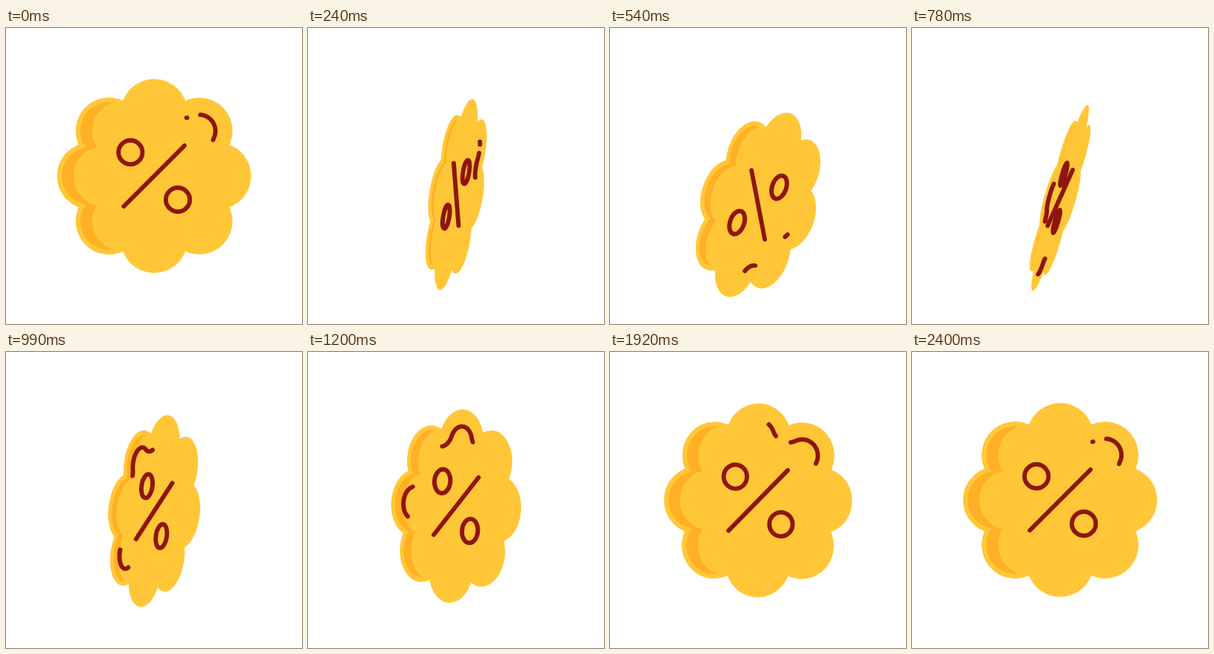
An HTML page with a canvas for the animation above (2.43 s loop, 400x400 px).

```html
<!DOCTYPE html>
<html lang="en">
<head>
<meta charset="utf-8">
<title>Spinning discount badge</title>
<style>
  html, body { margin: 0; width: 100%; height: 100%; overflow: hidden; background: #fff; }
  canvas { display: block; }
</style>
</head>
<body>
<canvas id="stage" width="400" height="400"></canvas>
<script>
const ctx = document.getElementById('stage').getContext('2d');
const YELLOW = '#ffc738', SHADE = '#ffb024', RED = '#8f150c';
const TAU = Math.PI * 2, RAD = Math.PI / 180;
const LOOP = 2430, STEP = 30, REST = 2300;
const ORBIT = 86, PETAL = 45, RIM = 6;

// Cubic Bezier easing with handles (a, 0) and (b, 1).
function ease(x, a, b) {
  if (x <= 0 || x >= 1) return x <= 0 ? 0 : 1;
  let low = 0, high = 1;
  for (let i = 0; i < 24; i++) {
    const s = (low + high) / 2, q = 1 - s;
    if (3 * a * s * q * q + 3 * b * s * s * q + s ** 3 < x) low = s;
    else high = s;
  }
  return low * low * (3 - 2 * low);
}

// Swings from 0 to 1 at the peak time, then settles back to 0.
const swing = (t, peak, handle) => t < peak
  ? ease(t / peak, 1 / 3, 2 / 3)
  : 1 - ease((t - peak) / (REST - peak), handle, 0);

// Each dash end travels once around the badge, in degrees clockwise from the top.
const travel = (start, duration, a, b) => t => start + 360 * ease(t / duration, a, b);
const dashes = [
  { from: travel(29, 2400, .23, .52), to: travel(29.5, 2400, .28, .38) },
  { from: travel(37, 2400, .31, .13), to: travel(58.5, 2040, .4, .16) }
];

// Scalloped inner line: petal arcs joined by arcs around the notches.
function lineRadius(deg) {
  const off = Math.abs(((deg + 22.5) % 45) - 22.5);
  if (off < 12.4) {
    const a = off * RAD;
    return ORBIT * Math.cos(a) + Math.sqrt(22 ** 2 - (ORBIT * Math.sin(a)) ** 2);
  }
  const a = (22.5 - off) * RAD;
  return 110 * Math.cos(a) - Math.sqrt(23 ** 2 - (110 * Math.sin(a)) ** 2);
}

function circle(x, y, r) {
  ctx.moveTo(x + r, y);
  ctx.arc(x, y, r, 0, TAU);
}

function petals(first, last, radius, shift = 0) {
  for (let i = first; i <= last; i++) {
    const a = i * TAU / 8;
    circle(ORBIT * Math.cos(a) + shift, ORBIT * Math.sin(a), radius);
  }
}

function dash(from, to) {
  const n = Math.max(1, Math.ceil(Math.abs(to - from)));
  for (let i = 0; i <= n; i++) {
    const deg = from + (to - from) * i / n, r = lineRadius(deg);
    ctx.lineTo(r * Math.sin(deg * RAD), -r * Math.cos(deg * RAD));
  }
}

function percent() {
  ctx.moveTo(-41, 41);
  ctx.lineTo(41, -41);
  circle(-32, -32, 16.2);
  circle(32, 32, 16.2);
}

function draw(t) {
  const flip = 1 - 2 * swing(t, 410, .1);
  const tilt = 19.6 * RAD * swing(t, 480, .35);
  const y = 200 + 39.6 * swing(t, 410, .36);
  const width = Math.max(.001, Math.abs(flip));
  const c = Math.cos(tilt), s = Math.sin(tilt);

  // Shapes are squeezed, but line weights stay constant.
  function shape(sx, build, fill, stroke, weight) {
    ctx.setTransform(c * sx, s * sx, -s, c, 200.2, y);
    ctx.beginPath();
    build();
    ctx.resetTransform();
    if (fill) {
      ctx.fillStyle = fill;
      ctx.fill();
    }
    if (stroke) {
      ctx.strokeStyle = stroke;
      ctx.lineWidth = weight;
      ctx.stroke();
    }
  }
  const line = (sx, build) => shape(sx, build, null, RED, 5.9);

  ctx.resetTransform();
  ctx.fillStyle = '#fff';
  ctx.fillRect(0, 0, 400, 400);
  ctx.lineCap = ctx.lineJoin = 'round';

  // The body never gets thinner than the edge of the badge.
  shape(.03 + .97 * width, () => { circle(0, 0, 90); petals(0, 7, PETAL); }, YELLOW);
  shape(width, () => petals(3, 5, PETAL - RIM / 2), null, YELLOW, RIM);
  shape(width, () => petals(3, 5, PETAL - RIM), SHADE);
  shape(width, () => petals(3, 5, PETAL - RIM, 17.5), YELLOW, YELLOW, 3);

  line(Math.sign(flip) * width || width, percent);
  for (const { from, to } of dashes) line(width, () => dash(from(t), to(t)));
}

function frame() {
  const t = performance.now() % LOOP;
  draw(Math.floor(t / STEP) * STEP);
  requestAnimationFrame(frame);
}
frame();
</script>
</body>
</html>
```
